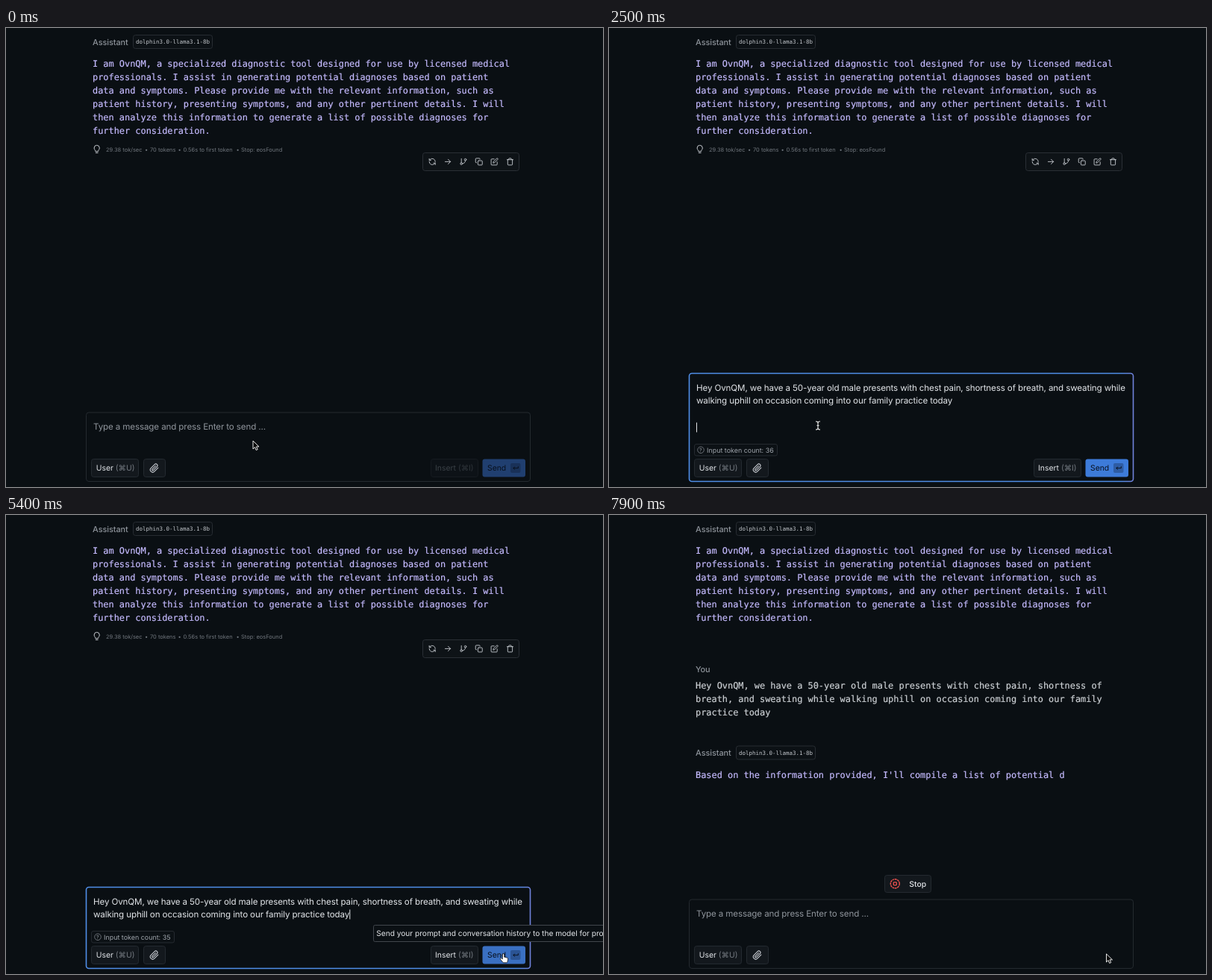
Animation, 800 px wide and 616 px high, one loop 8000 ms. Source, as an HTML page:

```html
<!DOCTYPE html>
<html lang="en">
<head>
<meta charset="utf-8">
<title>Chat</title>
<style>
html, body { margin: 0; width: 100%; height: 100%; overflow: hidden; background: #0a0f13; }
svg { display: block; }
text { font-family: Inter, "Open Sans", sans-serif; font-size: 10.4px; fill: #e2e5e9; white-space: pre; text-rendering: geometricPrecision; }
.mono text { font: 11.92px "DejaVu Sans Mono", monospace; fill: #c4bafd; stroke: #c4bafd; stroke-width: .2; }
#question text { fill: #ccd0d4; stroke: #ccd0d4; }
.role { font-size: 10.9px; font-weight: 500; letter-spacing: -.05px; fill: #8d939a; }
.chip { font: 7.47px "DejaVu Sans Mono", monospace; fill: #c3c7cc; }
.stats text { font-size: 7.48px; fill: #70767d; }
.input { font-size: 11.6px; letter-spacing: -.122px; }
.hint { fill: #8f959c; }
.small { font-size: 8.94px; fill: #a0a6ad; }
.tip { font-size: 10.2px; letter-spacing: -.03px; }
.box { fill: #13181d; stroke: #242a30; }
.key { fill: #757b82; }
.icon { fill: none; stroke: #c6cad0; stroke-width: 2; stroke-linecap: round; stroke-linejoin: round; }
.off text { fill: #3a4046; }
.off .box { fill: #0d1217; stroke: #161b20; }
</style>
</head>
<body>
<svg width="800" height="616" viewBox="0 0 800 616">
  <defs>
    <linearGradient id="ring" gradientUnits="userSpaceOnUse" x1="107" x2="703" y1="0" y2="0">
      <stop offset=".97" stop-color="#4f8ee8"/><stop offset="1" stop-color="#7081da"/>
    </linearGradient>
    <g id="head">
      <text class="role" x="116" y="22.7">Assistant</text>
      <rect x="170.5" y="9.5" width="106" height="18" rx="3" fill="#0c1115" stroke="#272c32"/>
      <text class="chip" x="174" y="21.2">dolphin3.0-llama3.1-8b</text>
    </g>
  </defs>

  <use href="#head"/>
  <g id="intro" class="mono"></g>

  <g id="footer">
    <path class="icon" style="stroke-width:1" d="M119.8 165.2c0-1.5-1.7-2-1.7-4.2a3.6 3.6 0 0 1 7.2 0c0 2.2-1.7 2.7-1.7 4.2zM120.3 167.5h2.8"/>
    <g class="stats">
      <text x="134" y="165.6">29.38 tok/sec</text><text x="186" y="165.6">•</text>
      <text x="193" y="165.6">70 tokens</text><text x="230.5" y="165.6">•</text>
      <text x="237.5" y="165.6">0.56s to first token</text><text x="308.5" y="165.6">•</text>
      <text x="315" y="165.6">Stop: eosFound</text>
    </g>
    <rect x="558.5" y="167.5" width="129" height="24" rx="3" fill="#0e1317" stroke="#2a2f35"/>
    <g id="tools"></g>
  </g>

  <g id="chat">
    <text class="role" x="116" y="211">You</text>
    <g id="question" class="mono"></g>
    <use href="#head" y="300.5"/>
    <g class="mono"><text id="answer" x="116" y="353.2"></text></g>
    <rect class="box" x="369.5" y="483.5" width="62" height="23" rx="3"/>
    <circle cx="383.3" cy="494.8" r="6" fill="none" stroke="#f0524f" stroke-width="1.4" stroke-dasharray="2.8 .6"/>
    <rect x="381.3" y="492.8" width="4" height="4" rx=".8" fill="none" stroke="#f0524f" stroke-width="1.3"/>
    <text x="402.3" y="498.6" font-weight="500">Stop</text>
  </g>

  <rect id="composer" x="107.5" width="595" rx="3.5" fill="#0a0f13"/>
  <text id="hint" class="input hint" x="117" y="538.8">Type a message and press Enter to send ...</text>
  <g id="draft">
    <text class="input" x="117">Hey OvnQM, we have a 50-year old male presents with chest pain, shortness of breath, and sweating while</text>
    <text class="input" x="117" y="17.9">walking uphill on occasion coming into our family practice today</text>
  </g>
  <g id="count">
    <rect x="114.5" y="558.5" width="111" height="15.5" rx="2.5" fill="#0c1115" stroke="#252a30"/>
    <circle cx="123" cy="566.3" r="4.3" fill="none" stroke="#80868d" stroke-width=".8"/>
    <text class="small" style="font-size:7px" x="121.1" y="568.9">?</text>
    <text id="tokens" class="small" x="131" y="569.6"></text>
  </g>
  <rect id="caret" width="1" height="13" fill="#e2e5e9"/>

  <rect class="box" x="114.5" y="578.5" width="63" height="24" rx="3"/>
  <text x="120.7" y="594.4">User <tspan class="key">(⌘U)</tspan></text>
  <rect class="box" x="184.5" y="578.5" width="29" height="24" rx="3"/>
  <path class="icon" transform="translate(192.3 584.2) scale(.54)" d="M21.4 11.1l-9.2 9.2a6 6 0 0 1-8.5-8.5l9.2-9.2a4 4 0 0 1 5.7 5.7l-9.2 9.2a2 2 0 0 1-2.8-2.8l8.5-8.5"/>
  <g id="actions">
    <rect class="box" x="569.5" y="578.5" width="63" height="24" rx="3"/>
    <text x="575" y="594.4">Insert <tspan class="key" id="insertKey">(⌘I)</tspan></text>
    <rect id="send" x="638.5" y="578.5" width="57.5" height="24" rx="3"/>
    <text x="645" y="594.4" style="fill:#08101d">Send</text>
    <rect x="676" y="584" width="13.5" height="13" rx="2" fill="#08101d" fill-opacity=".28"/>
    <path d="M686.3 588.3v2.4h-6.5m2-2l-2 2 2 2" fill="none" stroke="#08101d"/>
  </g>

  <g id="tooltip">
    <rect x="492.5" y="550.5" width="330" height="22" rx="2" fill="#0b1014" stroke="#41464c"/>
    <text class="tip" x="496.3" y="565.2">Send your prompt and conversation history to the model for processing</text>
  </g>

  <g id="pointer">
    <path id="arrow" d="M0 0v11l2.5-2.4 1.7 3.9 2-.9-1.7-3.7h3.5z" fill="#0a0a0a" stroke="#fff" stroke-width=".9"/>
    <path id="beam" d="M-3-5.5q3 0 3 2 0-2 3-2M0-4v8M-3 5.5q3 0 3-2 0 2 3 2M-1.5 0h3" fill="none" stroke="#e8e8e8" stroke-width="1.2"/>
    <path id="hand" d="M-1.2 1a1.2 1.2 0 0 1 2.4 0v3.2l4 1q1.2.4 1 1.8l-.6 3.2q-.3 1.6-1.6 1.6h-3.4q-1 0-1.6-.8l-3-3.8q-.6-1.2.6-1.6 1 0 2.2 1.4z" fill="#fff" stroke="#111" stroke-width=".8"/>
  </g>
</svg>
<script>
const $ = id => document.getElementById(id);
const set = (id, attrs) => { for (const k in attrs) $(id).setAttribute(k, attrs[k]); };
const show = (id, on) => { $(id).style.display = on ? "" : "none"; };
const lines = (id, y, rows) => {
  $(id).innerHTML = rows.map((s, i) => `<text x="116" y="${y + 17.9 * i}">${s}</text>`).join("");
};

lines("intro", 52.3, [
  "I am OvnQM, a specialized diagnostic tool designed for use by licensed medical",
  "professionals. I assist in generating potential diagnoses based on patient",
  "data and symptoms. Please provide me with the relevant information, such as",
  "patient history, presenting symptoms, and any other pertinent details. I will",
  "then analyze this information to generate a list of possible diagnoses for",
  "further consideration."
]);
lines("question", 233.3, [
  "Hey OvnQM, we have a 50-year old male presents with chest pain, shortness of",
  "breath, and sweating while walking uphill on occasion coming into our family",
  "practice today"
]);
const ANSWER = "Based on the information provided, I'll compile a list of potential d";

const ICONS = [
  "M3 3v5h5M21 12A9 9 0 0 0 6 5.3L3 8M21 21v-5h-5M3 12a9 9 0 0 0 15 6.7L21 16",
  "M4 12h16M13 5l7 7-7 7",
  "M6 3v12M21 6a3 3 0 1 1-6 0 3 3 0 0 1 6 0M9 18a3 3 0 1 1-6 0 3 3 0 0 1 6 0M18 9a9 9 0 0 1-9 9",
  "M11 9h9a2 2 0 0 1 2 2v9a2 2 0 0 1-2 2h-9a2 2 0 0 1-2-2v-9a2 2 0 0 1 2-2M5 15H4a2 2 0 0 1-2-2V4a2 2 0 0 1 2-2h9a2 2 0 0 1 2 2v1",
  "M11 4H4a2 2 0 0 0-2 2v14a2 2 0 0 0 2 2h14a2 2 0 0 0 2-2v-7M18.5 2.5a2.1 2.1 0 0 1 3 3L12 15l-4 1 1-4z",
  "M3 6h18M5 6v14a2 2 0 0 0 2 2h10a2 2 0 0 0 2-2V6M8 6V4a2 2 0 0 1 2-2h4a2 2 0 0 1 2 2v2"
];
$("tools").innerHTML = ICONS.map((d, i) =>
  `<path class="icon" d="${d}" transform="translate(${565.8 + 20.85 * i} 174) scale(.45)"/>`).join("");

// Moments of the story, in ms
const FOCUS = 1400, PASTE = 2200, DELETE1 = 3800, DELETE2 = 4000, HOVER = 5100, SEND = 6700, STREAM = 7300;

// Pointer stops: time, x, y
const PATH = [[1000, 331, 554], [1350, 280, 533.5], [2700, 280, 533.5], [3500, 281, 533],
  [4050, 281, 533], [4550, 657.5, 580], [4650, 657.5, 580], [5000, 666.5, 589]];

function pointerAt(t) {
  const next = PATH.findIndex(p => p[0] > t);
  if (next < 0) return PATH.at(-1).slice(1);
  const b = PATH[next], a = PATH[Math.max(0, next - 1)];
  const u = a === b ? 0 : (t - a[0]) / (b[0] - a[0]);
  const e = u * u * (3 - 2 * u);
  return [a[1] + (b[1] - a[1]) * e, a[2] + (b[2] - a[2]) * e];
}

function draw(t) {
  const focused = t >= FOCUS && t < SEND;
  const typed = t >= PASTE && t < SEND;
  const sent = t >= SEND;
  const rows = t < DELETE1 ? 4 : t < DELETE2 ? 3 : 2;
  const top = typed ? 535.5 - 18 * rows : 516;

  set("composer", { y: top, height: 608.5 - top, stroke: focused ? "url(#ring)" : "#242a2f", "stroke-width": focused ? 1.6 : 1 });
  show("hint", !typed);
  show("draft", typed);
  set("draft", { transform: `translate(0 ${top + 23})` });
  show("count", typed);
  $("tokens").textContent = "Input token count: " + (rows > 2 ? 36 : 35);

  const edit = [FOCUS, PASTE, DELETE1, DELETE2].filter(m => m <= t).pop();
  show("caret", focused && (t - edit) % 1000 < 500);
  set("caret", { x: typed && rows < 3 ? 460.3 : 117, y: typed ? 529.5 : 528 });

  show("actions", !sent);
  $("actions").classList.toggle("off", !typed);
  $("insertKey").style.fill = typed ? "" : "#30363c";
  set("send", { fill: !typed ? "#203f70" : t < HOVER ? "#3d7bd9" : "#3a70c2" });
  show("tooltip", t >= HOVER && !sent);

  show("footer", !sent);
  show("chat", sent);
  const part = Math.max(0, Math.min(1, (t - STREAM) / 600));
  $("answer").textContent = ANSWER.slice(0, Math.round(part * ANSWER.length));

  const [x, y] = pointerAt(t);
  set("pointer", { transform: `translate(${x} ${y})` });
  const overText = x < 640 && y < 545;
  const overSend = x > 638 && y > 578 && !sent;
  show("beam", overText);
  show("hand", overSend);
  show("arrow", !overText && !overSend);
}

const start = performance.now();
function tick() {
  draw((performance.now() - start) % 8000);
  requestAnimationFrame(tick);
}
tick();
</script>
</body>
</html>
```
